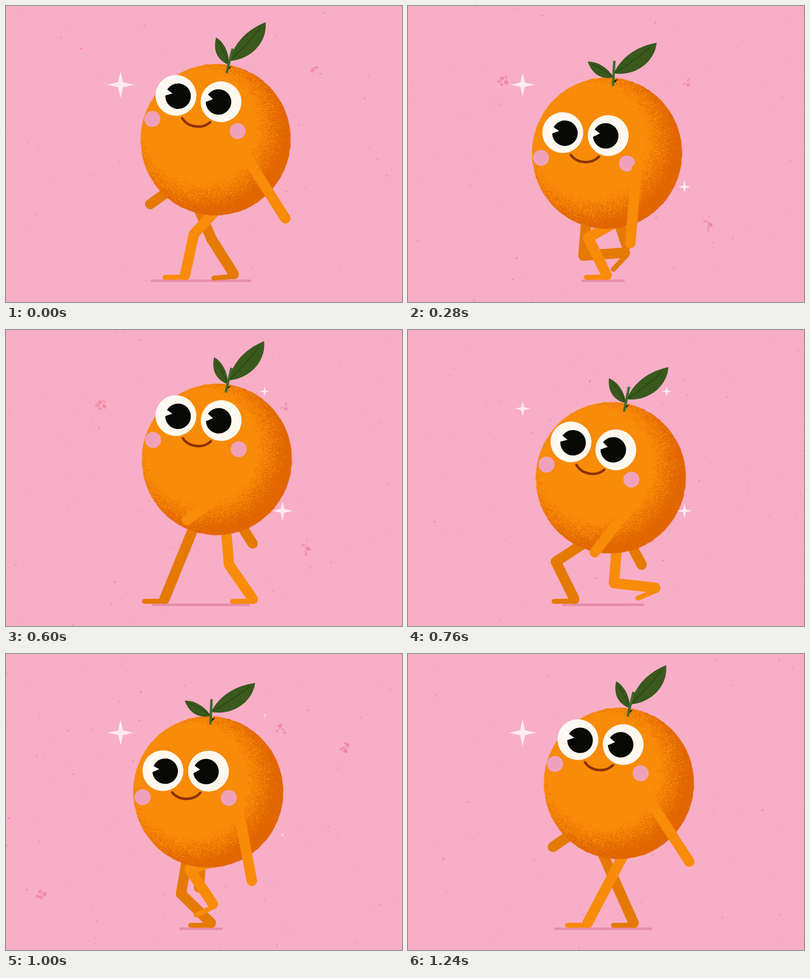
An HTML page with a canvas that plays this animation: 800x600 px, repeating every 1280 ms.

```html
<!DOCTYPE html>
<html>
<head>
<meta charset="utf-8">
<title>Walking orange</title>
<style>
html, body { margin: 0; width: 100%; height: 100%; overflow: hidden; background: #f8aec6; }
canvas { display: block; }
</style>
</head>
<body>
<canvas id="stage" width="800" height="600"></canvas>
<script>
const LOOP = 1280, STRIDE = LOOP / 2, STEP = 40, TAU = Math.PI * 2;
const GROUND = 545, BONE = 84, ARM = 151;
const ORANGE = '#f88b08', DARK_ORANGE = '#e57a03', LEAF = '#39591d';
const ctx = document.getElementById('stage').getContext('2d');
const rad = deg => deg * Math.PI / 180;
const clamp = v => Math.min(1, Math.max(0, v));
const smooth = v => v * v * (3 - 2 * v);

function seeded(seed) {
  return () => {
    seed = (seed + 0x6D2B79F5) | 0;
    let v = Math.imul(seed ^ (seed >>> 15), 1 | seed);
    v = (v + Math.imul(v ^ (v >>> 7), 61 | v)) ^ v;
    return ((v ^ (v >>> 14)) >>> 0) / 4294967296;
  };
}

// Sine swing around a mean, with its peak time, and optionally an overtone.
const swing = period => (mean, amp = 0, peak = 0, amp2 = 0, peak2 = 0) => t =>
  mean + amp * Math.cos(TAU * (t - peak) / period)
  + amp2 * Math.cos(2 * TAU * (t - peak2) / period);
const perStride = swing(STRIDE), perLoop = swing(LOOP);

// Shortest distance between two times on the loop
const apart = (t, peak) => {
  const d = Math.abs(t - peak) % LOOP;
  return Math.min(d, LOOP - d);
};
const bump = (t, peak, width) => Math.cos(Math.PI / 2 * clamp(apart(t, peak) / width)) ** 2;

const BODY = {
  x: perStride(414.1, 12.7, 565),
  y: perStride(280.3, 26.3, 197),
  tilt: perStride(5, 5.2, 95),
  face: perStride(-57.5, 21.7, 280),
  stem: perStride(8.2, 5.8, 13),
  bigLeaf: perStride(38.9, 6.3, 627, 2.9, 280),
  smallLeaf: perStride(42.5, 18, 330),
  shadow: perStride(69, 30, 0)
};

const FRONT = {
  color: ORANGE, delay: 0,
  shoulder: [60, 32], arm: perLoop(-7.5, 43, 1240, 2.5, 280),
  hipX: perStride(26, 16, 380), hipY: 130, footShift: perStride(0)
};
const BACK = {
  color: DARK_ORANGE, delay: STRIDE,
  shoulder: [-9, 43], arm: perLoop(2.5, 44, 590, 14.5, 308),
  hipX: perStride(-41), hipY: 124, footShift: perStride(-27, 17, 320)
};
const footX = perLoop(428, 72, 670, 7, 80);
const SWING_START = 600;

const STARS = [
  { x: 231.5, y: 159.5, size: t => 27.5 * (1 - (1 - apart(t, 600) / STRIDE) ** 3) },
  { x: 558.5, y: 366.5, size: t => 20.5 * bump(t, 540, 640) },
  { x: 522.5, y: 124.5, size: t => 11.3 * bump(t, 700, 480) }
];

// Paper textures: start time, density and the few larger blots.
const PAPERS = [
  { from: 0, count: 450, blots: [[626, 130]] },
  { from: 160, count: 650, blots: [[192, 154], [565, 154], [606, 446]] },
  { from: 640, count: 650, blots: [] },
  { from: 960, count: 700, blots: [[557, 154], [69, 489], [685, 191]] },
  { from: 1120, count: 450, blots: [] }
];

function layer(width, height) {
  const canvas = document.createElement('canvas');
  canvas.width = width;
  canvas.height = height;
  return [canvas, canvas.getContext('2d')];
}

function makePaper({ from, count, blots }) {
  const [canvas, g] = layer(800, 600);
  const rnd = seeded(from + 11);
  g.fillStyle = '#f8aec6';
  g.fillRect(0, 0, 800, 600);
  g.fillStyle = '#ee6f95';
  const speck = (x, y, size) => {
    g.beginPath();
    g.ellipse(x, y, size, size * (0.4 + 0.6 * rnd()), rnd() * 3, 0, TAU);
    g.fill();
  };
  for (let i = 0; i < count; i++) {
    g.globalAlpha = 0.12 + 0.5 * rnd() ** 2;
    speck(rnd() * 800, rnd() * 600, 0.5 + 2 * rnd() ** 5);
  }
  g.globalAlpha = 0.45;
  for (const [x, y] of blots) {
    for (let i = 0; i < 8; i++) {
      speck(x + (rnd() - 0.5) * 20, y + (rnd() - 0.5) * 20, 1 + 4 * rnd());
    }
  }
  return canvas;
}

function makePeel() {
  const [canvas, g] = layer(320, 320);
  const rnd = seeded(7);
  g.fillStyle = ORANGE;
  g.beginPath();
  for (let i = 0; i < 200; i++) {
    const a = i / 200 * TAU, k = rnd() - 0.5;
    g.lineTo(160 + Math.cos(a) * (151.5 + k), 160 + Math.sin(a) * (153.5 + k));
  }
  g.fill();
  // Stippled shade, denser towards the lower right rim
  g.globalCompositeOperation = 'source-atop';
  g.fillStyle = '#e26600';
  for (let y = 0; y < 320; y++) {
    for (let x = 0; x < 320; x++) {
      const shade = smooth(clamp((Math.hypot(x - 125, y - 138) - 106) / 72));
      if (rnd() < shade) g.fillRect(x, y, 1, 1);
    }
  }
  return canvas;
}

const papers = PAPERS.map(makePaper);
const peel = makePeel();

function line(points, width, color) {
  ctx.beginPath();
  for (const [x, y] of points) ctx.lineTo(x, y);
  ctx.lineWidth = width;
  ctx.strokeStyle = color;
  ctx.stroke();
}

function disc(x, y, r, color) {
  ctx.beginPath();
  ctx.arc(x, y, r, 0, TAU);
  ctx.fillStyle = color;
  ctx.fill();
}

function shape(points, color) {
  ctx.beginPath();
  for (const [x, y] of points) ctx.lineTo(x, y);
  ctx.closePath();
  ctx.fillStyle = color;
  ctx.fill();
}

// Knee of two equal bones between hip and ankle, bending forward
function kneeBetween([hx, hy], [ax, ay]) {
  const dx = ax - hx, dy = ay - hy, d = Math.hypot(dx, dy);
  const bend = Math.sqrt(Math.max(0, BONE * BONE - d * d / 4)) / d;
  return [(hx + ax) / 2 - dy * bend, (hy + ay) / 2 + dx * bend];
}

function drawLeg(side, body, t) {
  const gait = (t + side.delay) % LOOP;
  const s = clamp(((gait - SWING_START + LOOP) % LOOP) / STRIDE);
  const lift = Math.sin(Math.PI * s) ** 2;
  const pitch = rad(7 + 48 * lift * lift + 12 * Math.sin(TAU * s));

  const hip = [body.x + side.hipX(t), body.y + side.hipY];
  const ankle = [footX(gait) + side.footShift(t), GROUND - 45 * lift];
  const toe = [ankle[0] - 41 * Math.cos(pitch), ankle[1] + 41 * Math.sin(pitch)];
  line([hip, kneeBetween(hip, ankle), ankle], 21, side.color);
  line([toe, [ankle[0] + 4, ankle[1] + 4.5]], 10, side.color);
}

function drawArm(side, body, t) {
  const a = rad(side.arm(t));
  const x = body.x + side.shoulder[0], y = body.y + side.shoulder[1];
  line([[x, y], [x + ARM * Math.sin(a), y + ARM * Math.cos(a)]], 21, side.color);
}

function drawLeaf([x, y], angle, length, upper, lower) {
  ctx.save();
  ctx.translate(x, y);
  ctx.rotate(angle);
  ctx.beginPath();
  ctx.moveTo(0, 0);
  ctx.bezierCurveTo(length * 0.3, -upper, length * 0.65, -upper, length, 0);
  ctx.bezierCurveTo(length * 0.75, lower, length * 0.3, lower, 0, 0);
  ctx.fillStyle = LEAF;
  ctx.fill();
  ctx.beginPath();
  ctx.moveTo(0, 0);
  ctx.quadraticCurveTo(length * 0.45, 4, length * 0.85, 0);
  ctx.lineWidth = 1.2;
  ctx.strokeStyle = '#223d12';
  ctx.stroke();
  ctx.restore();
}

function drawEye(x, y, pupilShift, shine) {
  disc(x, y, 41.3, 'rgba(255,252,247,0.97)');
  const px = x + pupilShift, py = y + 1;
  disc(px, py, 25.8, '#080904');
  shape([[px - 12, py - 4], [px - shine, py - 15], [px - shine, py + 5]], '#fffefc');
}

function drawFace(y) {
  drawEye(-92, y, 4.5, 32);
  drawEye(0, y, -5, 28);
  for (const x of [-132.5, 41.5]) disc(x, y + 54, 16.2, '#efa1bb');
  ctx.beginPath();
  ctx.moveTo(-73, y + 44);
  ctx.bezierCurveTo(-59, y + 61, -30, y + 61, -16, y + 44);
  ctx.lineWidth = 5;
  ctx.strokeStyle = '#8a3206';
  ctx.stroke();
}

function drawSprig(body) {
  const tilt = rad(body.tilt), stem = rad(body.stem);
  const x = body.x + 3 * Math.cos(tilt) + 138 * Math.sin(tilt);
  const y = body.y + 3 * Math.sin(tilt) - 138 * Math.cos(tilt);
  const along = d => [x + d * Math.sin(stem), y - d * Math.cos(stem)];
  shape([[x + 1, y - 3], [x + 3, y - 10], [x + 10, y - 13], [x + 6, y - 8]], '#100d03');
  drawLeaf(along(24), -rad(body.bigLeaf), 107, 18, 30);
  drawLeaf(along(16), -rad(90 + body.smallLeaf), 61, 17, 11);
  ctx.lineCap = 'butt';
  line([along(-1), along(50)], 5, '#41692a');
  ctx.lineCap = 'round';
}

function drawStar({ x, y, size }, t) {
  const r = size(t);
  if (r < 0.5) return;
  const points = [];
  for (let i = 0; i < 8; i++) {
    const d = i % 2 ? r * 0.26 : r;
    points.push([x + d * Math.cos(i * TAU / 8), y + d * Math.sin(i * TAU / 8)]);
  }
  shape(points, '#ffeaf1');
}

function draw(t) {
  const body = {};
  for (const key in BODY) body[key] = BODY[key](t);

  ctx.lineCap = ctx.lineJoin = 'round';
  ctx.drawImage(papers[PAPERS.findLastIndex(p => p.from <= t)], 0, 0);
  line([[394 - body.shadow, 557], [394 + body.shadow, 557]], 5, '#e88cac');

  drawArm(BACK, body, t);
  drawLeg(BACK, body, t);
  drawLeg(FRONT, body, t);

  ctx.save();
  ctx.translate(body.x, body.y);
  ctx.rotate(rad(body.tilt));
  ctx.drawImage(peel, -160, -160);
  drawFace(body.face);
  ctx.restore();

  drawSprig(body);
  drawArm(FRONT, body, t);
  STARS.forEach(star => drawStar(star, t));
}

const start = performance.now();
function tick() {
  const t = (performance.now() - start) % LOOP;
  draw(Math.floor(t / STEP) * STEP);
  requestAnimationFrame(tick);
}
tick();
</script>
</body>
</html>
```
